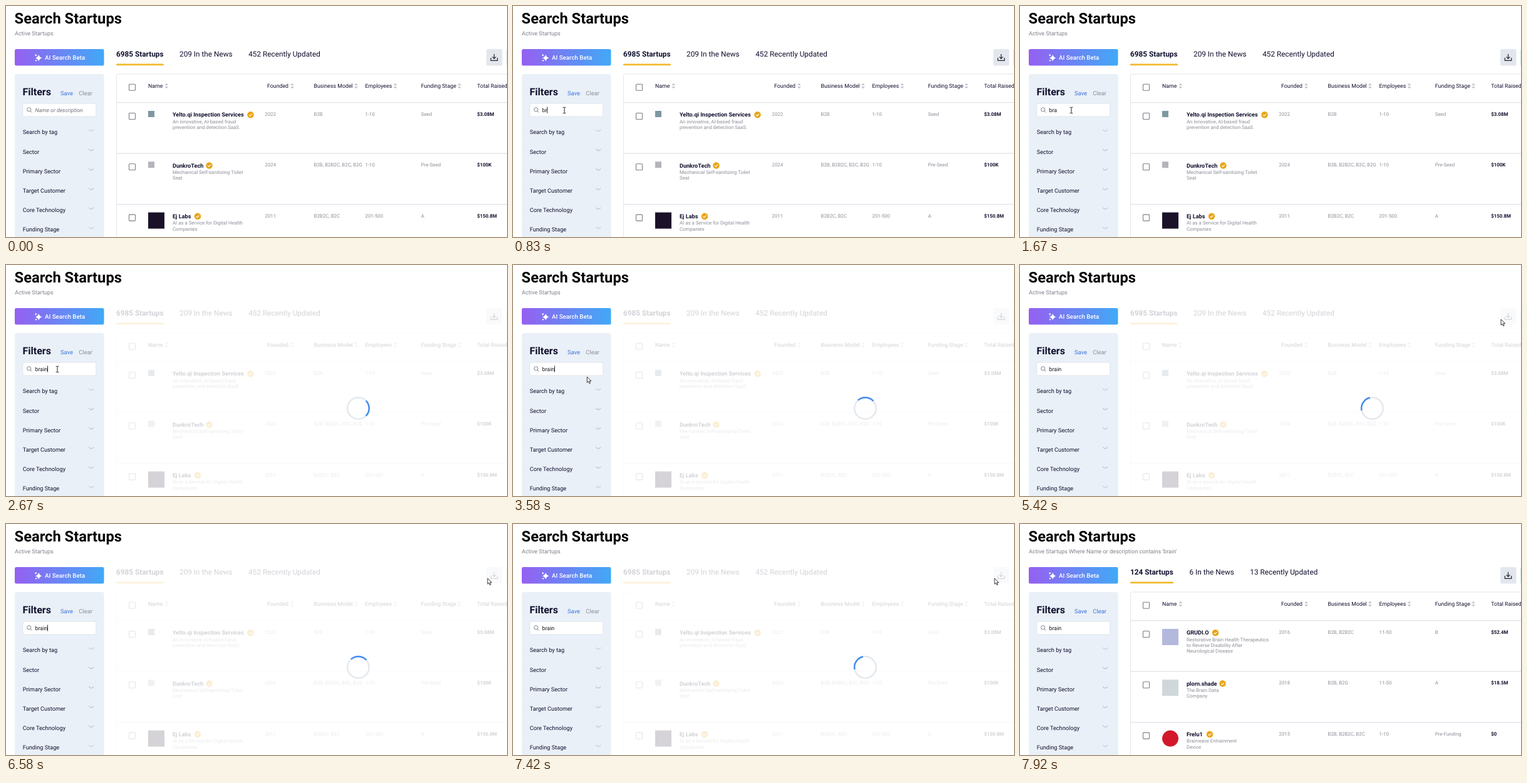
Recreate the animation shown at these times as an HTML page. Size 800 by 370 pixels, loop 8000 ms.

```html
<!DOCTYPE html>
<html lang="en">
<head>
<meta charset="utf-8">
<title>Search Startups</title>
<style>
  html, body { margin: 0; width: 100%; height: 100%; overflow: hidden; background: #fff; }
  svg { display: block; font-family: Roboto, sans-serif; text-rendering: geometricPrecision; }
  text { white-space: pre; }
</style>
</head>
<body>
<svg id="stage" width="800" height="370" viewBox="0 0 800 370">
  <defs>
    <linearGradient id="violetBlue">
      <stop offset="0" stop-color="#9560f1"/>
      <stop offset="1" stop-color="#41a9f6"/>
    </linearGradient>
  </defs>
</svg>
<script>
const NAVY = '#10102e', GRAY = '#8c8e98', BLUE = '#3b73e0', LINE = '#e3e6eb';
const stage = document.getElementById('stage');

function add(parent, tag, attrs = {}, content) {
  const node = document.createElementNS('http://www.w3.org/2000/svg', tag);
  for (const key in attrs) node.setAttribute(key, attrs[key]);
  if (content !== undefined) node.textContent = content;
  parent.appendChild(node);
  return node;
}
const group = (parent, attrs) => add(parent, 'g', attrs);
const rect = (parent, x, y, width, height, fill, extra) =>
  add(parent, 'rect', { x, y, width, height, fill, ...extra });
const path = (parent, d, stroke, extra) =>
  add(parent, 'path', { d, stroke, fill: 'none', ...extra });
const label = (parent, x, y, size, fill, content, extra) =>
  add(parent, 'text', { x, y, 'font-size': size, fill, ...extra }, content);
const bold = { 'font-weight': 700 };
const show = (node, visible) => node.setAttribute('visibility', visible ? 'inherit' : 'hidden');

// Four-pointed star for the AI button
function sparkle(parent, x, y, r) {
  const q = r * 0.2;
  add(parent, 'path', { fill: '#fff', d:
    `M${x} ${y - r}Q${x + q} ${y - q} ${x + r} ${y}Q${x + q} ${y + q} ${x} ${y + r}` +
    `Q${x - q} ${y + q} ${x - r} ${y}Q${x - q} ${y - q} ${x} ${y - r}` });
}

function badge(parent, x, y) {
  const points = Array.from({ length: 24 }, (_, i) => {
    const a = i * Math.PI / 12, r = i % 2 ? 4.9 : 5.6;
    return `${x + r * Math.cos(a)},${y + r * Math.sin(a)}`;
  });
  add(parent, 'polygon', { points: points.join(' '), fill: '#e9a517' });
  path(parent, `M${x - 2.3} ${y + .1}l1.7 1.7 3-3.3`, '#fff', { 'stroke-width': 1.1 });
}

function checkbox(parent, y) {
  rect(parent, 196.5, y - 5, 10, 10, '#fff', { rx: 1, stroke: '#7d7f88', 'stroke-width': 1.1 });
}

function logo(parent, { shape, size, color }, y) {
  if (shape === 'circle') add(parent, 'circle', { cx: 240, cy: y + 13, r: size / 2, fill: color });
  else rect(parent, 227, y, size, size, color);
}

function buildTable(parent, { tabs, underline, rows }) {
  const g = group(parent);
  tabs.forEach(([x, content], i) =>
    label(g, x, 80.6, 11.8, NAVY, content, i ? {} : bold));
  rect(g, 176, 92.5, underline, 2.7, '#f2b92c', { rx: 1 });

  rect(g, 767, 69, 25.5, 26.5, '#e3e7ed', { rx: 2.5 });
  rect(g, 798.7, 69, 10, 26.5, '#e3e7ed', { rx: 2.5 });
  path(g, 'M779.5 77v7M776.6 81.4l2.9 2.9 2.9-2.9M774.3 83v4.3h10.4V83', '#23252e', { 'stroke-width': 1.2 });

  rect(g, 176.5, 109, 640, 290, 'none', { rx: 3, stroke: LINE });
  [154.5, 236, 317.5].forEach(y => rect(g, 177, y - .5, 623, 1.2, '#dfe2e8'));

  checkbox(g, 130.3);
  [[227, 'Name', 256.3], [417, 'Founded', 457], [491.5, 'Business Model', 559],
   [573.5, 'Employees', 621.5], [662.8, 'Funding Stage', 724], [752.3, 'Total Raised', 806]]
    .forEach(([x, content, sortX]) => {
      label(g, x, 130.7, 8.8, NAVY, content);
      add(g, 'path', { fill: '#c3c5cb',
        d: `M${sortX - 2.8} 127l2.8-3.6 2.8 3.6zM${sortX - 2.8} 129l2.8 3.6 2.8-3.6z` });
    });

  rows.forEach((row, i) => {
    const y = 81.3 * i;
    checkbox(g, 176.5 + y);
    logo(g, row.logo, 168 + y);
    label(g, 266, 177.4 + y, 9.1, NAVY, row.name, bold);
    badge(g, row.badge, 174.3 + y);
    row.about.forEach((line, n) => label(g, 266, 187.5 + y + 9.4 * n, 7.85, GRAY, line));
    [413.5, 491.5, 573.5, 662.8].forEach((x, n) =>
      label(g, x, 175.9 + y, 7.85, GRAY, row.cells[n]));
    label(g, 752.3, 175.9 + y, 7.85, NAVY, row.raised, bold);
  });
  return g;
}

function buildSidebar(parent) {
  rect(parent, 14, 69, 142.5, 26.5, 'url(#violetBlue)', { rx: 2.5 });
  sparkle(parent, 52.2, 83.2, 5.4);
  sparkle(parent, 47.7, 78.8, 2);
  sparkle(parent, 48, 87.3, 1.8);
  label(parent, 62, 86, 9.75, '#fff', 'AI Search Beta', { 'font-weight': 500 });

  rect(parent, 14, 109, 142.5, 280, '#eaf0f7', { rx: 4 });
  label(parent, 26.5, 143, 16, NAVY, 'Filters', bold);
  label(parent, 87, 143, 9.4, BLUE, 'Save');
  rect(parent, 26.8, 156, 117, 21, '#fff', { rx: 2.5, stroke: '#dde2e9', 'stroke-width': .9 });
  add(parent, 'circle', { cx: 36.7, cy: 165.8, r: 3.1, fill: 'none', stroke: '#70737d', 'stroke-width': .9 });
  path(parent, 'M39 168.2l2.4 2.4', '#70737d', { 'stroke-width': .9 });

  ['Search by tag', 'Sector', 'Primary Sector', 'Target Customer', 'Core Technology', 'Funding Stage']
    .forEach((content, i) => {
      const y = 31.2 * i;
      label(parent, 26.7, 205.3 + y, 9.2, NAVY, content);
      path(parent, `M132.3 ${198 + y}q3.9 5 7.8 0`, '#bcc2cc', { 'stroke-width': 1.2 });
    });
}

const square = (size, color) => ({ shape: 'square', size, color });

label(stage, 13.6, 28.2, 23.7, '#050508', 'Search Startups', bold);
const subtitle = label(stage, 14, 47.4, 9.1, '#7f818b');
buildSidebar(stage);
const clearLink = label(stage, 116.3, 143, 9.4, GRAY, 'Clear');
const placeholder = label(stage, 46.5, 169.7, 8.7, '#6d7078', 'Name or description', { 'font-style': 'italic' });
const query = label(stage, 46.5, 169.7, 8.9, '#16161e');
const caret = rect(stage, 0, 161.5, .9, 10, '#111');

const allStartups = buildTable(stage, {
  tabs: [[176, '6985 Startups'], [277, '209 In the News'], [387.2, '452 Recently Updated']],
  underline: 76,
  rows: [
    { name: 'Yelto.qi Inspection Services', badge: 390.5, logo: square(10, '#7f97a3'),
      about: ['An innovative, AI-based fraud', 'prevention and detection SaaS.'],
      cells: ['2022', 'B2B', '1-10', 'Seed'], raised: '$3.08M' },
    { name: 'DunkroTech', badge: 324.5, logo: square(10, '#b4b4ba'),
      about: ['Mechanical Self-sanitizing Toilet', 'Seat'],
      cells: ['2024', 'B2B, B2B2C, B2C, B2G', '1-10', 'Pre-Seed'], raised: '$100K' },
    { name: 'Ej Labs', badge: 306, logo: square(26, '#1b1229'),
      about: ['AI as a Service for Digital Health', 'Companies'],
      cells: ['2011', 'B2B2C, B2C', '201-500', 'A'], raised: '$150.8M' },
  ],
});

const matches = buildTable(stage, {
  tabs: [[176, '124 Startups'], [270.5, '6 In the News'], [367.3, '13 Recently Updated']],
  underline: 69,
  rows: [
    { name: 'GRUDI.O', badge: 312, logo: square(26, '#b3b8dd'),
      about: ['Restorative Brain Health Therapeutics', 'to Reverse Disability After', 'Neurological Disease'],
      cells: ['2016', 'B2B, B2B2C', '11-50', 'B'], raised: '$52.4M' },
    { name: 'plorn.shade', badge: 323.5, logo: square(26, '#cfd7db'),
      about: ['The Brain Data', 'Company'],
      cells: ['2018', 'B2B, B2G', '11-50', 'A'], raised: '$18.5M' },
    { name: 'Frelu1', badge: 303, logo: { shape: 'circle', size: 26, color: '#d3182b' },
      about: ['Brainwave Entrainment', 'Device'],
      cells: ['2015', 'B2B, B2B2C, B2C', '1-10', 'Pre-Funding'], raised: '$0' },
  ],
});

const spinner = group(stage);
add(spinner, 'circle', { cx: 562.5, cy: 229.5, r: 17.3, fill: 'none', stroke: '#e3e9ee', 'stroke-width': 2.5 });
const arcEnd = 17.3 * Math.SQRT1_2;
const arc = path(spinner, `M${arcEnd} ${-arcEnd}A17.3 17.3 0 0 1 ${arcEnd} ${arcEnd}`, '#438df0', { 'stroke-width': 2.5 });

const beam = group(stage);
path(beam, 'M-2.3-4.7h1.8l.5.5.5-.5h1.8M0-4.2V4.2M-2.3 4.7h1.8l.5-.5.5.5h1.8', '#222', { 'stroke-width': 1 });
const arrow = group(stage);
path(arrow, 'M0 0v9.3l2.1-2 1.5 3.4 1.6-.7-1.5-3.3h2.9z', '#222', { fill: '#fff', 'stroke-width': .9 });

// Times below count ticks of 1/12 second
const TICK = 1000 / 12, LOOP = 96;
const FOCUS = 6, LOAD = 30, RESPIN = 42, RESULTS = 92;
const KEYS = [8, 10, 13, 28, 30];
const POINTER = [[1, 300, 380], [5, 82, 167], [42, 82, 167], [49, 738, 385],
                 [56, 738, 385], [62, 768, 87], [70, 768, 87], [72, 769, 87], [LOOP, 769, 87]];

function pointerAt(tick) {
  const next = Math.max(1, POINTER.findIndex(p => p[0] > tick));
  const [t0, x0, y0] = POINTER[next - 1], [t1, x1, y1] = POINTER[next];
  const u = Math.max(0, (tick - t0) / (t1 - t0)), e = u * u * (3 - 2 * u);
  return [x0 + (x1 - x0) * e, y0 + (y1 - y0) * e];
}

function draw(tick) {
  const typed = KEYS.filter(k => k <= tick).length;
  const loading = tick >= LOAD && tick < RESULTS, done = tick >= RESULTS;

  subtitle.textContent = 'Active Startups' + (done ? " Where Name or description contains 'brain'" : '');
  clearLink.setAttribute('fill', done ? BLUE : GRAY);

  query.textContent = 'brain'.slice(0, typed);
  show(placeholder, !typed);
  const lastInput = typed ? KEYS[typed - 1] : FOCUS;
  show(caret, tick >= FOCUS && !done && (tick - lastInput) % 12 < 6);
  caret.setAttribute('x', 46.3 + (typed ? query.getComputedTextLength() : 0));

  show(allStartups, !done);
  show(matches, done);
  allStartups.setAttribute('opacity', loading ? .18 : 1);

  show(spinner, loading);
  const angle = tick * 30 + (tick < RESPIN ? 120 : 63);
  arc.setAttribute('transform', `translate(562.5 229.5) rotate(${angle % 360})`);

  const [x, y] = pointerAt(tick);
  const overInput = x > 27 && x < 144 && y > 156 && y < 177;
  show(beam, overInput && !done);
  show(arrow, !overInput && !done);
  for (const cursor of [beam, arrow]) cursor.setAttribute('transform', `translate(${x} ${y})`);
}

const start = performance.now();
function play() {
  draw(Math.floor((performance.now() - start + 5) / TICK) % LOOP);
  requestAnimationFrame(play);
}
play();
</script>
</body>
</html>
```
